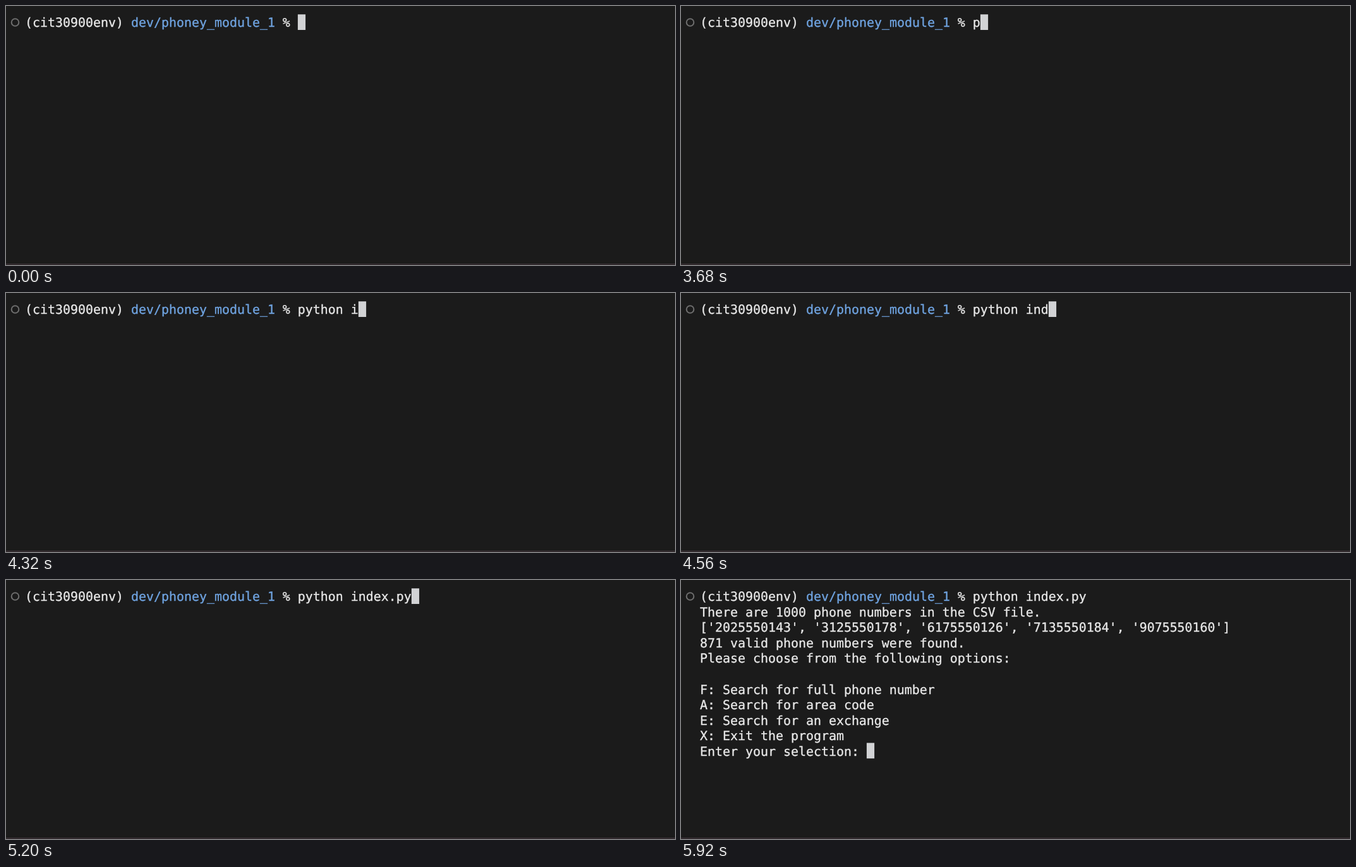
Recreate the animation shown at these times as an HTML page. Size 1059x411 px, loop 8000 ms.

```html
<!DOCTYPE html>
<html lang="en">
<head>
<meta charset="utf-8">
<title>Terminal session</title>
<style>
  html, body { margin: 0; width: 100%; height: 100%; overflow: hidden; background: #1b1b1b; }
  svg { display: block; }
  text {
    font: 19.932px "DejaVu Sans Mono", monospace;
    font-variant-ligatures: none; text-rendering: geometricPrecision; white-space: pre;
    fill: #e8e8e8; stroke: #e8e8e8; stroke-width: .35px;
  }
  .path { fill: #6fa3e0; stroke: #6fa3e0; }
</style>
</head>
<body>
<svg width="1059" height="411" fill="none">
  <circle cx="14.5" cy="26" r="5.8" stroke="#6e6e6e" stroke-width="2"/>
  <path d="M0 409.7H1059" stroke="#43363d" stroke-width="1.2"/>
  <g id="screen"></g>
  <rect id="cursor" width="12.2" height="24.7" fill="#d2d3d5"/>
  <g id="pointer" stroke-linecap="round">
    <path id="beam" stroke="#f2f2f2" stroke-width="3.4"/>
    <path id="core" stroke="#111" stroke-width="1.3"/>
  </g>
</svg>
<script>
const LOOP = 8000, LEFT = 30, CELL = 12, ROW = 24.52, TOP = 13.3, BASELINE = 33.4;
const ENV = "(cit30900env) ", DIR = "dev/phoney_module_1", COMMAND = "python index.py";
const PROMPT = ENV + " ".repeat(DIR.length) + " % ";
const REPLY = `There are 1000 phone numbers in the CSV file.
['2025550143', '3125550178', '6175550126', '7135550184', '9075550160']
871 valid phone numbers were found.
Please choose from the following options:

F: Search for full phone number
A: Search for area code
E: Search for an exchange
X: Exit the program
Enter your selection: `.split("\n");

// [time in ms, characters typed so far]
const KEYS = [
  [3680, 1], [3760, 2], [4080, 3], [4160, 5], [4240, 7], [4320, 8],
  [4480, 9], [4560, 10], [4800, 12], [4880, 13], [5120, 14], [5200, 15]
];
const POINT = 1040, ENTER = 5840, PRINT = 5920;

const $ = id => document.getElementById(id);

const BEAM = "M603 130.3Q606.5 130.3 606.5 133V143Q606.5 145.7 603 145.7" +
  "M610 130.3Q606.5 130.3 606.5 133M606.5 143Q606.5 145.7 610 145.7M605 139.5H608";
for (const id of ["beam", "core"]) $(id).setAttribute("d", BEAM);

function addText(col, row, content, className = "") {
  const node = document.createElementNS("http://www.w3.org/2000/svg", "text");
  node.setAttribute("x", LEFT + col * CELL);
  node.setAttribute("y", BASELINE + row * ROW);
  node.setAttribute("class", className);
  node.textContent = content;
  return $("screen").appendChild(node);
}

addText(ENV.length, 0, DIR, "path");
const promptLine = addText(0, 0, PROMPT);
const replyLines = REPLY.map((line, i) => addText(0, i + 1, line));

function placeCursor(col, row) {
  $("cursor").setAttribute("x", LEFT - 0.1 + col * CELL);
  $("cursor").setAttribute("y", TOP + row * ROW);
}

function draw(now) {
  const t = now % LOOP;
  let typed = 0;
  for (const [time, count] of KEYS) if (t >= time) typed = count;

  promptLine.textContent = PROMPT + COMMAND.slice(0, typed);
  for (const line of replyLines) line.style.display = t >= PRINT ? "" : "none";
  $("pointer").style.display = t >= POINT && t < KEYS[0][0] ? "" : "none";

  if (t >= PRINT) placeCursor(REPLY.at(-1).length, REPLY.length);
  else if (t >= ENTER) placeCursor(0, 1);
  else placeCursor(PROMPT.length + typed, 0);

  requestAnimationFrame(draw);
}
requestAnimationFrame(draw);
</script>
</body>
</html>
```
